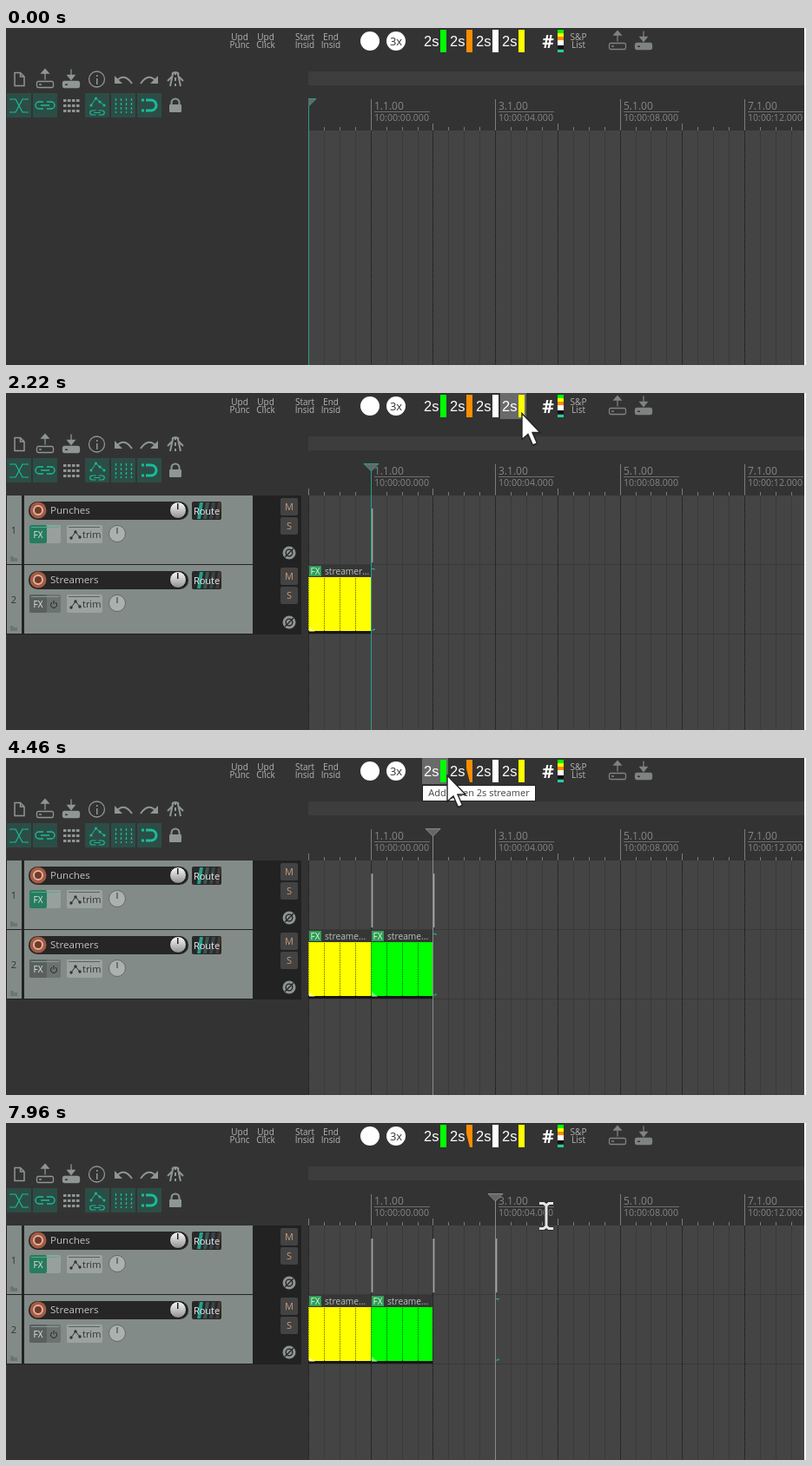
These frames come from a looping animation (921x388 px, 8000 ms). An HTML page with a canvas:

```html
<!DOCTYPE html>
<html lang="en">
<head>
<meta charset="utf-8">
<title>Streamers and punches</title>
<style>
html, body { margin: 0; width: 100%; height: 100%; overflow: hidden; background: #333; }
canvas { display: block; }
</style>
</head>
<body>
<canvas id="stage" width="921" height="388"></canvas>
<script>
const ctx = document.getElementById('stage').getContext('2d');
const LOOP = 8000, LEFT = 348, RIGHT = 919, WIDTH = RIGHT - LEFT, BAR = 71.72;
const SANS = '"Open Sans", "Noto Sans", sans-serif';
const TEAL = '#1abc98', ICON = '#8f9693', PANEL = '#828b88';
const barX = n => Math.round(LEFT + n * BAR);

// Mouse path: time, x, y
const path = [
  [70, 857, 372], [770, 417, 97], [1150, 417, 97], [1690, 588, 24], [1760, 599, 20],
  [2150, 599, 20], [2700, 489, 97], [3150, 490, 96], [3520, 508, 20], [4600, 508, 20],
  [5320, 563, 97], [5930, 563, 97], [6270, 562, 31], [6340, 562, 22], [6670, 562, 18],
  [7100, 562, 18], [7590, 418, 22], [7740, 418, 22], [7950, 618, 106]
];
const clicks = [[900, 1110], [1950, 2130], [2970, 3150], [3790, 3950], [5660, 5860], [7590, 7740]];
const buttons = [404, 434, 479, 509, 539, 569];

function box(x, y, w, h, fill, r = 0) {
  ctx.fillStyle = fill;
  ctx.beginPath();
  ctx.roundRect(x, y, w, h, r);
  ctx.fill();
}
function disc(x, y, r, fill, stroke, width = 1) {
  ctx.beginPath();
  ctx.arc(x, y, r, 0, 7);
  if (fill) { ctx.fillStyle = fill; ctx.fill(); }
  if (stroke) { ctx.strokeStyle = stroke; ctx.lineWidth = width; ctx.stroke(); }
}
function text(str, x, y, size, fill, align = 'left', family = SANS, weight = '') {
  ctx.font = `${weight} ${size}px ${family}`;
  ctx.textAlign = align;
  ctx.fillStyle = fill;
  ctx.fillText(str, x, y);
}
function draw(d, x, y, stroke, width = 1.5, fill) {
  const shape = new Path2D(d);
  ctx.save();
  ctx.translate(x, y);
  if (fill) { ctx.fillStyle = fill; ctx.fill(shape); }
  if (stroke) { ctx.strokeStyle = stroke; ctx.lineWidth = width; ctx.stroke(shape); }
  ctx.restore();
}
function dotted(x, top, bottom, color) {
  ctx.setLineDash([1, 1]);
  draw(`M.5 ${top}V${bottom}`, x, 0, color, 1);
  ctx.setLineDash([]);
}

function drive(x, y, up, color) {
  draw('M-8 3H8Q9.500 3 9.500 5V8Q9.500 10 8 10H-8Q-9.500 10 -9.500 8V5Q-9.500 3 -8 3ZM-7 6.500H-4', x, y, color, 1.3, up ? null : color);
  if (!up) box(x - 7, y + 6, 3, 1.5, '#333');
  draw(up ? 'M0 1V-9M-4 -6.500L0 -11L4 -6.500Z' : 'M0 -11V-3M-4 -4L0 1L4 -4Z', x, y, color, 1.3, color);
}

function topBar(hover, smudge) {
  if (hover) box(hover, 0, 30, 30, '#6a6a6a');
  const labels = [['Upd', 'Punc', 269], ['Upd', 'Click', 299], ['Start', 'Insid', 344], ['End', 'Insid', 374], ['S&P', 'List', 659]];
  for (const [a, b, x] of labels) {
    text(a, x, 14, 10, '#b4b4b4', 'center');
    text(b, x, 23, 10, '#b4b4b4', 'center');
  }
  disc(419, 15, 11, '#fff');
  disc(449, 15, 11, '#fff');
  text('3x', 449, 20, 13, '#333', 'center');
  ['#0f0', '#ff8c00', '#fff', '#ff0'].forEach((color, i) => {
    text('2s', 481 + i * 30, 21, 16.5, '#fff', 'left', '"Liberation Sans", sans-serif');
    box(500 + i * 30, 2, 7, 26, color);
  });
  if (smudge) draw('M0 12L4 28H0Z', 530, 0, null, 0, '#333');
  text('#', 624, 23, 21, '#fff', 'center', SANS, 'bold');
  const stripes = [['#0f0', 2, 4], ['#ff0', 6, 4], ['#ff8c00', 10, 4], ['#fff', 14, 6], ['#111', 20, 4], ['#1fd0a8', 25, 3]];
  for (const [color, y, h] of stripes) box(635, y, 7, h, color);
  drive(704, 14.5, true, '#7f8381');
  drive(734, 14.5, false, '#7f8381');
}

function sideBar() {
  draw('M-5 -7.500H1.500L6 -3V7.500H-5ZM1.500 -7.500V-3H6', 15, 59, ICON);
  drive(45, 58.5, true, ICON);
  drive(75, 58.5, false, ICON);
  disc(104.5, 59, 9, null, ICON, 1.3);
  box(104, 58, 1.5, 7, ICON);
  box(104, 54, 1.5, 2, ICON);
  const bend = 'M-8 2Q1 -8 10 5', head = 'M-10 -4V5H-1Z';
  for (const side of [1, -1]) {
    ctx.save();
    ctx.translate(150 - side * 15, 59);
    ctx.scale(side, 1);
    draw(bend, 0, 0, ICON, 2);
    draw(head, 0, 0, null, 0, ICON);
    ctx.restore();
  }
  draw('M-2.500 -8L-6 8M2.500 -8L6 8M0 -8V-5M0 -2V2M0 5V8M-9 2L-4 -3M9 2L4 -3', 195, 59, ICON, 2);
  draw('M-4 -6Q0 -10 4 -6', 195, 59, ICON, 2);

  for (const x of [1, 31, 91, 121, 151]) box(x, 75, 28, 28, '#2c4d46');
  draw('M-11 -7H-4L4 8H11M-11 8H-4L4 -7H11', 15, 89, TEAL, 1.2);
  const link = 'M-2 -4H-7A4 4 0 0 0 -7 4H-2M2 -4H7A4 4 0 0 1 7 4H2M-5 0H5';
  draw(link, 45, 89, TEAL, 1.4);
  for (let i = 0; i < 12; i++) box(66 + i % 4 * 5, 82 + (i >> 2) * 6, 3.5, 3, ICON);
  ctx.save();
  ctx.translate(105, 97.5);
  ctx.scale(.75, .65);
  draw(link, 0, 0, TEAL, 1.6);
  ctx.restore();
  draw('M-7 2L-1.500 -6L3 -2L8 2', 105, 87, TEAL, 1);
  for (const [x, y] of [[98, 89], [103.5, 81], [108, 85], [113, 89]]) disc(x, y, 1.5, TEAL);
  ctx.setLineDash([3, 2]);
  for (let i = 0; i < 4; i++) draw('M0 -8V9', 126.5 + i * 6, 89, TEAL, 1.3);
  ctx.setLineDash([]);
  draw('M-4 -6H2A6 6 0 0 1 2 6H-4', 165, 89, TEAL, 3);
  draw('M-9 -6H-6M-9 6H-6', 165, 89, TEAL, 3);
  draw('M-4.500 0V-3A4.500 4.500 0 0 1 4.500 -3V0', 195, 89, ICON, 2);
  box(188, 88, 14, 9, ICON, 1);
}

function timeline() {
  box(LEFT, 50, WIDTH, 16, '#3d3d3d');
  box(LEFT, 118, WIDTH, 270, '#444');
  for (let i = 0; i < 32; i++) {
    const bar = i / 4, x = barX(bar);
    const whole = i % 4 === 0, labelled = i % 8 === 4;
    const top = labelled ? 82 : whole ? 110 : 114;
    box(x, top, 1, 118 - top, '#7b7b7b');
    if (whole) dotted(x, 118, 388, '#0c0c0c');
    else box(x, 118, 1, 270, '#3a3a3a');
    if (labelled) {
      text(`${bar}.1.00`, x + 4, 94, 12, '#858585');
      box(x + 4, 96, 64, 1, '#6e6e6e');
      text(`10:00:${String((bar - 1) * 2).padStart(2, '0')}.000`, x + 4, 107, 10.6, '#858585');
    }
  }
}

function track(n, name, y) {
  box(0, y, 340, 80, '#222');
  box(1, y, 17, 79, PANEL);
  box(21, y, 263, 79, PANEL);
  text(n, 9, y + 44, 11, '#333', 'center');
  draw('M-4 3V-3H-1L0 -1H4V3Z', 9, y + 73, null, 0, '#6c7572');

  box(26, y + 7, 184, 21, '#262626', 10);
  disc(37, y + 17, 9.5, '#a55a42');
  disc(37, y + 17, 5, '#743826', '#d8b5a5', 2);
  text(name, 51, y + 21, 11.6, '#c2c2c2');
  const shine = ctx.createLinearGradient(0, y + 7, 0, y + 27);
  shine.addColorStop(0, '#fff');
  shine.addColorStop(1, '#8a8a8a');
  disc(198, y + 17, 9.5, shine, '#151515', 1);
  box(197, y + 9, 1.5, 7, '#222');

  box(214, y + 7, 34, 21, '#282828', 2);
  ['#23a08c', '#405350', '#38444c', '#453a37'].forEach((color, i) =>
    draw('M2 0H6L3 19H-1Z', 221 + i * 7, y + 8, null, 0, color));
  text('Route', 231, y + 22, 11, '#e8e8e8', 'center');

  const active = n === 1;
  box(27, y + 34, 36, 21, active ? '#98a09d' : '#6b7371', 2);
  box(27, y + 34, 20, 21, active ? '#267c5e' : '#59605e', 2);
  box(29, y + 36, 32, 1, active ? '#4fae8b' : '#899');
  text('FX', 37, y + 49, 10, '#e4e4e4', 'center');
  if (!active) draw('M-2 -2A3.500 3.500 0 1 0 2 -2M0 -4V0', 55, y + 45, '#222', 1);
  box(70, y + 34, 41, 21, '#9ba29f', 2);
  box(72, y + 36, 36, 1, '#59605e');
  draw('M-5 4L0 -3L5 3', 80, y + 45, '#333', 1);
  for (const [dx, dy] of [[-5, 4], [0, -3], [5, 3]]) disc(80 + dx, y + 45 + dy, 1.7, '#333');
  text('trim', 88, y + 49, 11, '#333');
  disc(128, y + 44, 9.5, '#abb1ae', '#626a67', 1);
  box(127.5, y + 37, 1, 7, '#333');

  box(316, y + 3, 20, 20, '#434343', 2);
  box(316, y + 25, 20, 20, '#434343', 2);
  text('M', 326, y + 17, 11, '#c99a78', 'center');
  text('S', 326, y + 39, 11, '#c99a78', 'center');
  disc(326, y + 66, 7.5, '#8d9491');
  disc(326, y + 66, 3.8, null, '#222', 1.3);
  draw('M-5 5L5 -5', 326, y + 66, '#222', 1.3);

  box(LEFT, y + 79, WIDTH, 1, '#393939');
}

function streamer(bar, color, label) {
  const x = barX(bar), w = barX(bar + 1) - x;
  box(x, 198, w, 14, '#363636');
  box(x + 1, 199, 14, 12, '#2f9d55');
  text('FX', x + 8, 209, 10, '#e6f5ea', 'center');
  text(label, x + 19, 209, 10.2, '#b9c4b9');
  box(x, 212, w, 63, color);
  for (let i = 0; i < 4; i++) dotted(barX(bar + i / 4), 213, 274, 'rgba(0,0,0,.65)');
  box(x, 274, w, 3, '#161616');
  draw('M1 275V269L8 275Z', x, 0, null, 0, 'rgba(255,255,255,.45)');
}

function punch(bar) {
  const x = barX(bar);
  box(x, 133, 3, 62, '#666');
  box(x + 1, 133, 1, 62, '#a0a5a2');
}

function editCursor(x, teal, hasTracks) {
  const color = teal ? '#2a9f89' : '#878b89';
  ctx.save();
  ctx.beginPath();
  ctx.rect(LEFT, 70, WIDTH, 318);
  ctx.clip();
  draw('M-8 81.500H9L.5 90Z', x, 0, color, 1, '#626967');
  box(x, 90, 1, 298, color);
  ctx.restore();
  if (hasTracks) draw('M0 202.500H3.500V204M0 273H3.500V271', x + .5, 0, TEAL, 1);
}

function tooltip(x, w, str, alpha) {
  if (alpha <= 0) return;
  ctx.globalAlpha = Math.min(1, alpha);
  box(x, 31, w, 19, '#222');
  box(x + 1, 32, w - 2, 17, '#fff');
  text(str, x + w / 2, 44, 11, '#444', 'center');
  ctx.globalAlpha = 1;
}

function mouseAt(t) {
  const i = path.findIndex(key => key[0] > t);
  if (i < 0) return path[path.length - 1].slice(1);
  const [t0, x0, y0] = path[i - 1], [t1, x1, y1] = path[i];
  const p = (t - t0) / (t1 - t0), e = p * p * (3 - 2 * p);
  return [x0 + (x1 - x0) * e, y0 + (y1 - y0) * e];
}

function mouse(t, x, y) {
  if (clicks.some(([from, to]) => t >= from && t < to)) disc(x, y, 24, 'rgba(240,224,20,.7)');
  if (y > 72 && y < 118) {
    const beam = 'M-8 -14.500H-3L0 -12L3 -14.500H8M-8 14.500H-3L0 12L3 14.500H8M0 -12V12';
    draw(beam, x + 4, y + 1, '#2a2a2a', 5);
    draw(beam, x + 4, y + 1, '#e6e6e6', 3);
  } else {
    draw('M0 0V30L7 24L12.500 36.500L17.500 34.500L12 22H21Z', x, y, '#222', 1.4, '#fff');
  }
}

function render(t) {
  const hasTracks = t >= 2130, hasGreen = t >= 3950;
  const [x, y] = t < 70 ? [-99, 388] : mouseAt(t);
  const hover = y <= 30 && buttons.find(b => x >= b && x <= b + 30);
  box(0, 0, 921, 388, '#333');
  topBar(hover, t >= 3450);
  sideBar();
  timeline();
  if (hasTracks) {
    track(1, 'Punches', 118);
    track(2, 'Streamers', 198);
    streamer(0, '#ff0', hasGreen ? 'streame...' : 'streamer...');
    punch(1);
  }
  if (hasGreen) {
    streamer(1, '#0f0', 'streame...');
    punch(2);
  }
  if (t >= 7800) punch(3);
  const bar = t < 1110 ? 0 : t < 3150 ? 1 : t < 5860 ? 2 : 3;
  editCursor(barX(bar), t < 3150, hasTracks);
  if (t < 4650) tooltip(479, 131, 'Add green 2s streamer', (t - 4330) / 120);
  if (t < 7200) tooltip(539, 130, 'Add white 2s streamer', (t - 6940) / 120);
  if (t >= 70) mouse(t, x, y);
  box(RIGHT, 0, 2, 388, '#fff');
}

const start = performance.now();
function tick() {
  render((performance.now() - start) % LOOP);
  requestAnimationFrame(tick);
}
tick();
</script>
</body>
</html>
```
